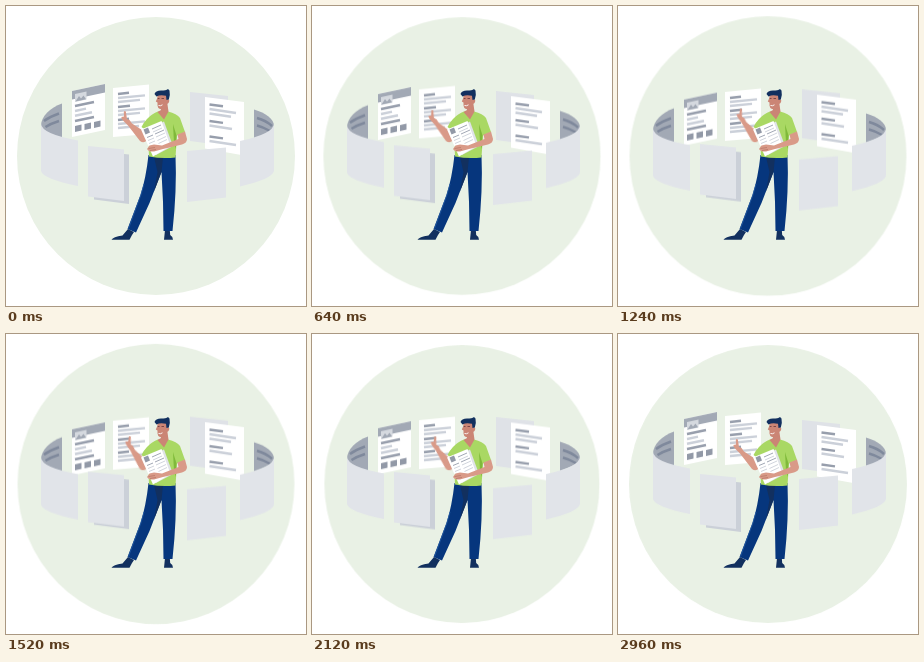
Animation, 300 px wide and 300 px high, one loop 3000 ms. Source, as an HTML page:

```html
<!DOCTYPE html>
<html lang="en">
<head>
<meta charset="utf-8">
<title>Floating documents</title>
<style>
  html, body { margin: 0; width: 100%; height: 100%; overflow: hidden; background: #fff; }
  svg { display: block; width: 100vw; height: 100vh; }

  .bob { animation: bob 3s cubic-bezier(.37, 0, .63, 1) infinite; }
  @keyframes bob {
    60% { transform: translateY(var(--d)); }
  }

  .disc { transform-origin: 150px 150px; animation: breathe 3s ease-in-out infinite; }
  @keyframes breathe {
    25% { transform: scale(.997, .999); }
    50% { transform: scale(.996, 1.008); }
    84% { transform: scale(.987, .996); }
  }

  .forearm { transform-origin: 137px 132px; animation: lift 3s cubic-bezier(.37, 0, .63, 1) infinite; }
  @keyframes lift {
    60% { transform: rotate(11deg); }
  }

  .disc { fill: #e9f1e5; }
  .sheet { fill: #fff; }
  .panel { fill: #e1e4e9; }
  .shade { fill: #cbd0d8; }
  .rear { fill: #dfe2e7; }
  .badge { fill: #d5d9df; }
  .inner { fill: #a2a9b5; }
  .line { fill: none; stroke-width: 2.4; }
  .thin { fill: none; stroke-width: .9; }
  .dark { stroke: #979eac; }
  .light { stroke: #cbd0d9; }
  .deep { stroke: #7f899c; }
  .block { fill: #9299a7; }
  .skin { fill: #d99a88; }
  .face { fill: #cb8575; }
  .shirt { fill: #a9d863; }
  .fold { fill: #7fb93a; }
  .pants { fill: #06367d; }
  .navy { fill: #12305f; }
</style>
</head>
<body>
<svg viewBox="0 0 300 300">
  <circle class="disc" cx="150" cy="150" r="139"/>

  <!-- inner faces of the ring -->
  <g class="bob" style="--d:6px">
    <path class="inner" d="M35 120C35 110 44 102 56 97.500V133L45 129Q35 125 35 120Z"/>
    <path class="line deep" d="M38 115Q44 110.500 53 107.500M39.500 121Q45 117.500 53 115"/>
  </g>
  <g class="bob" style="--d:5px">
    <path class="inner" d="M268 120C268 113 260 107 248 103.500V133L258 129Q268 125 268 120Z"/>
    <path class="line deep" d="M251 112Q260 114.500 266 120M251 119.500Q257 121 264 125"/>
  </g>

  <!-- profile page -->
  <g class="bob" style="--d:11px">
    <path class="sheet" d="M66 85L99 78V124L66 131Z"/>
    <path class="inner" d="M66 85L99 78V86.500L66 93.500Z"/>
    <path class="badge" d="M69 88L80.500 85.500V93.500L69 96Z"/>
    <path class="inner" d="M69.500 95.500L73 90L75 92.500L77.500 89.500L80 93.300Z"/>
    <path class="line dark" d="M69 100L88 96M69 115L88 111"/>
    <path class="line light" d="M69 105L80 102.700M69 109.800L86 106.300"/>
    <path class="block" d="M69 120L75.500 118.600V124.600L69 126ZM78.500 118L85 116.600V122.600L78.500 124ZM88 116L94.500 114.600V120.600L88 122Z"/>
  </g>

  <!-- text page -->
  <g class="bob" style="--d:5px">
    <path class="sheet" d="M107 82L143 78.500V128L107 131Z"/>
    <path class="line dark" d="M112 88L123 86.800M112 101L124 99.800M112 114L123 112.800"/>
    <path class="line light" d="M112 92L139 89.400M112 96L134 93.900M112 105L139 102.400M112 109L134 106.900M112 118L139 115.400M112 122L133 120"/>
  </g>

  <!-- right pages -->
  <path class="rear bob" style="--d:-3.500px" d="M184 86L222 90V140L184 135Z"/>
  <g class="bob" style="--d:-3px">
    <path class="sheet" d="M199 91L238 96V149.500L199 142.500Z"/>
    <path class="line dark" d="M203.500 98.500L217 100.300M203.500 115L217 116.900M203.500 130.500L217 132.400"/>
    <path class="line light" d="M203.500 103L230 107M203.500 107.500L225 110.700M203.500 119.500L226 123M203.500 135L230 139"/>
  </g>

  <!-- outer faces of the ring -->
  <path class="panel bob" style="--d:6px" d="M35 118Q36 128 72 134.500V180Q37 173 35 165Z"/>
  <path class="panel bob" style="--d:6px" d="M268 118Q267 128 234 135V180.500Q266 173 268 165Z"/>

  <!-- lower panels -->
  <path class="shade bob" style="--d:-3px" d="M88 145L123 148.500V198L88 193.500Z"/>
  <path class="panel bob" style="--d:-2.500px" d="M82 140L118 143.500V195L82 190.500Z"/>
  <path class="panel bob" style="--d:11px" d="M181 145L220 141.500V191.500L181 196Z"/>

  <!-- raised arm -->
  <path class="skin forearm" d="M139 126L126 117.500L123.500 114L121 113L119.800 105.500Q118.500 104.500 117.800 106L118 110.500L115.500 111Q115 113 118 115.500L122 119.500L134 135Q138 138 141 134Z"/>

  <!-- legs and shoes -->
  <path class="navy" d="M122 223L128 226L126 229L123.500 233.800H105.500Q107 231 116.500 229.500ZM159 224H163.800L164.200 229Q167 230.500 167 233.800H158Z"/>
  <path class="pants" d="M142.500 149H169.500Q171 184 166.500 225H157.500Q157.500 196 155.500 166L143.500 197L130 226.500L121.500 223L134.500 189Q140 172 142.500 149Z"/>
  <path class="navy" d="M148 151H157L155.500 166L148 185.500L151.500 166Z"/>
  <path class="thin" stroke="#2258a0" d="M138 178L134.900 189L122.500 222.500"/>

  <!-- torso -->
  <path class="shirt" d="M141 113Q146 107.500 152 105.500L162 105.500Q171 107.500 174 112L179 126L171 129.500L169.500 151.500Q156 153 143 150.500L142 126L135.500 121Q138 116 141 113Z"/>
  <path class="fold" d="M170.500 129.500L167 118L168 137L169.800 143Z"/>
  <path class="face" d="M155 99L161 95L162.500 105.500L158 113.500L151.500 106L155 104Z"/>

  <!-- head turned to the pages -->
  <path class="face" d="M151.500 88L161 88.500L161.300 93.500Q163.300 92.500 163.300 95Q163 97.500 161 98L159.500 102Q157 104 154 103Q151.800 102.500 151.500 99.500V96.500L149.800 95.500L151.300 92Z"/>
  <path class="navy" d="M148.500 88Q149.500 84.500 155 84.500Q160 84.500 162 83L163.500 84.500Q164.500 89 162.800 93.500L160.500 94L160 89.800Q154 88.500 150.500 90.500Z"/>
  <path class="thin" stroke="#713f43" d="M151.800 92.500H153.500M155.500 92.500H158"/>
  <path class="thin" stroke="#fff" d="M152.500 99.500Q154.500 100.300 156.500 98.800"/>

  <!-- held papers -->
  <path class="rear" d="M142 123L158 115.500L167 140L150 149Z"/>
  <path class="sheet" d="M135 123.500L155.500 115L164.500 140L147 150.500Z"/>
  <path class="block" d="M137.500 123.500L142 121.500L144 126.500L139.500 128.500Z"/>
  <path class="thin dark" d="M146 123L155 119M141 131.500L147 129M149 128L158 124"/>
  <path class="thin light" d="M147 126L156 122M142 134.500L148 132M150 131L159 127M143 137.500L149 135M151.500 134.500L160 130.500M152.500 137.500L161 133.500"/>

  <!-- holding arm -->
  <path class="skin" d="M171.500 128.500L179 125.500L181 133Q181 137 176 138.500L157 143L148 145.500Q142.500 146 141 143L143.500 139.500L148 138.500L156 139.500L172.500 133Z"/>
  <path class="thin" stroke="#bd7c6d" d="M142.500 142.500L149 141.500M144 144.500L150 143.500"/>
</svg>
</body>
</html>
```
